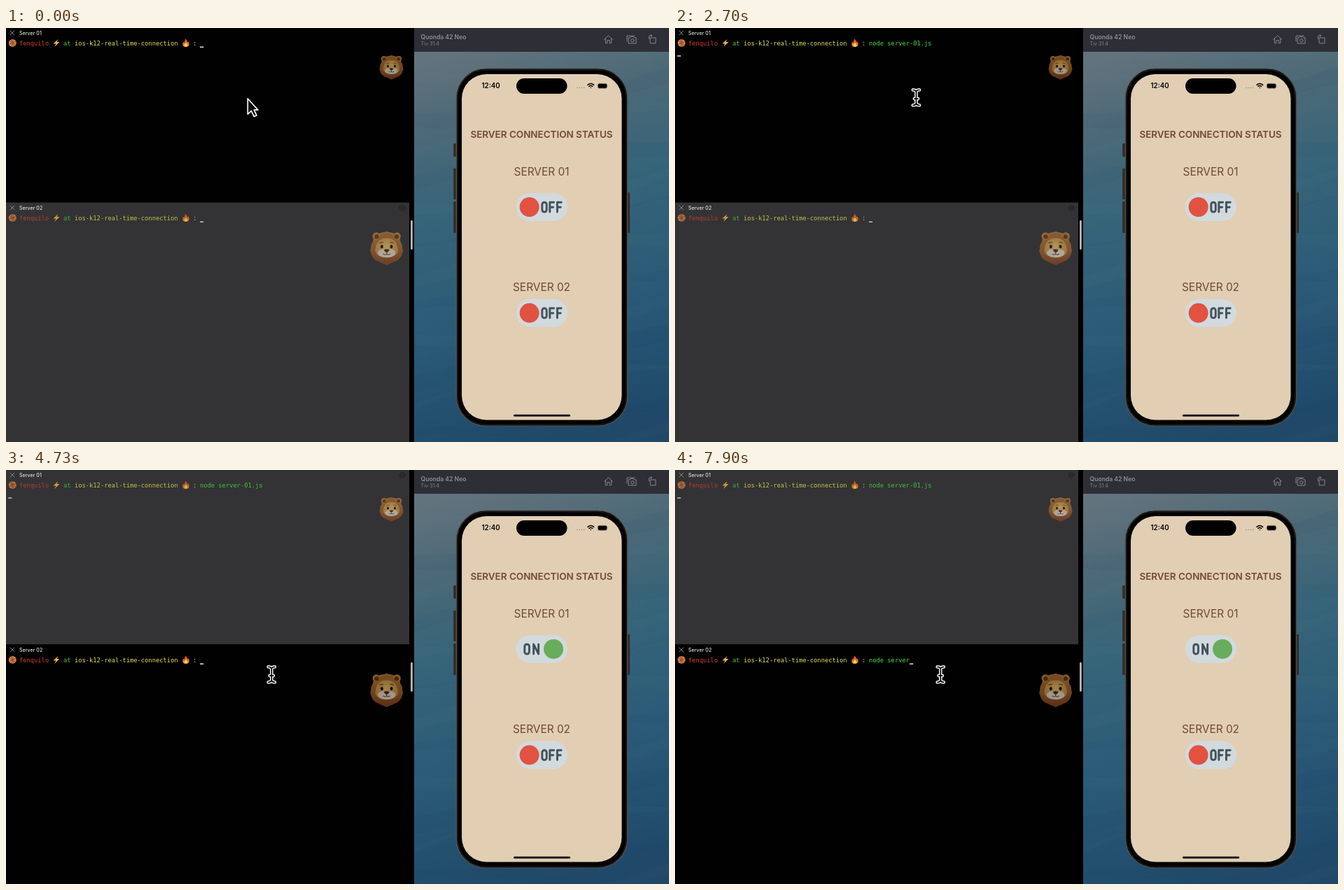
Recreate the animation shown at these times as an HTML page. Size 947 px wide and 592 px high, loop 8000 ms.

```html
<!DOCTYPE html>
<html lang="en">
<head>
<meta charset="utf-8">
<title>Server connection status</title>
<style>
  html, body { margin: 0; width: 100%; height: 100%; overflow: hidden; background: #000; }
  svg { display: block; width: 947px; height: 592px; font-family: Inter, "Open Sans", sans-serif; }
  .mono { font: 8.75px "DejaVu Sans Mono", "Liberation Mono", monospace; }
  .line { fill: none; stroke-linecap: round; stroke-linejoin: round; }
  .word { stroke: #42525c; stroke-width: 2.9; }
  .app { fill: #6f4a30; text-anchor: middle; }
</style>
</head>
<body>
<svg id="stage" viewBox="0 0 947 592">
  <defs>
    <linearGradient id="sea" gradientUnits="userSpaceOnUse" x1="650" y1="34" x2="790" y2="592">
      <stop offset="0" stop-color="#62737d"/>
      <stop offset=".18" stop-color="#4b6977"/>
      <stop offset=".4" stop-color="#356479"/>
      <stop offset=".68" stop-color="#2a5a77"/>
      <stop offset="1" stop-color="#1f4869"/>
    </linearGradient>
    <linearGradient id="mane" x1="0" y1="0" x2="0" y2="1">
      <stop offset="0" stop-color="#c08238"/>
      <stop offset=".55" stop-color="#a9662c"/>
      <stop offset="1" stop-color="#8a4523"/>
    </linearGradient>
    <radialGradient id="fur" cx=".5" cy=".4" r=".65">
      <stop offset="0" stop-color="#f0c266"/>
      <stop offset="1" stop-color="#cf9040"/>
    </radialGradient>
    <linearGradient id="flame" x1="0" y1="0" x2="0" y2="1">
      <stop offset="0" stop-color="#dc3d1c"/>
      <stop offset="1" stop-color="#f59a2c"/>
    </linearGradient>
    <clipPath id="desk"><rect x="583" y="34" width="364" height="558"/></clipPath>

    <g id="lion" opacity=".66">
      <path fill="url(#mane)" d="M0-24C-5-22-9-23-13-20C-18-18-20-13-20-9C-24-5-22 0-24 4C-22 9-22 13-18 16C-15 20-11 19-8 22C-5 22-3 25 0 25C3 25 5 22 8 22C11 19 15 20 18 16C22 13 22 9 24 4C22 0 24-5 20-9C20-13 18-18 13-20C9-23 5-22 0-24Z"/>
      <g fill="#c4873a"><circle cx="-15" cy="-17" r="5.6"/><circle cx="15" cy="-17" r="5.6"/></g>
      <g fill="#70391b"><circle cx="-14.5" cy="-16.4" r="3.2"/><circle cx="14.5" cy="-16.4" r="3.2"/></g>
      <path fill="#b2702f" d="M-13-9Q-12-21 0-22Q12-21 13-9Z"/>
      <path fill="url(#fur)" d="M0-14C10-15 15-8 16 0C19 8 11 14 0 14C-11 14-19 8-16 0C-15-8-10-15 0-14Z"/>
      <path fill="#eee4cf" d="M0 2C6 1 14 3 13 8C11 13 5 14 0 14C-5 14-11 13-13 8C-14 3-6 1 0 2Z"/>
      <path fill="#f0c470" d="M-3-6H3L4 4H-4Z"/>
      <path fill="#5a2b1b" d="M-4 2.5Q0 1 4 2.5Q3 6 0 6.6Q-3 6-4 2.5Z"/>
      <path class="line" stroke="#5a3a28" stroke-width="1" d="M0 6V9M-5 9Q-2 11 0 9Q2 11 5 9"/>
      <g fill="#17110e"><ellipse cx="-7" cy="-2" rx="2" ry="2.7"/><ellipse cx="7" cy="-2" rx="2" ry="2.7"/></g>
      <path class="line" stroke="#7a4219" stroke-width="1.1" d="M-10-7Q-8-9-5-8M10-7Q8-9 5-8"/>
    </g>

    <g id="ball">
      <circle r="5.5" fill="#dc8048"/>
      <path class="line" stroke="#5e321c" stroke-width=".6" d="M-5 2L5-2M-2-5L2 5M-4.6-3Q0-2-.5 5.4M.5-5.4Q0 2 4.6 3"/>
    </g>
    <path id="bolt" fill="#f5b53c" d="M2.5-5.5L-4.5 1.2H-.6L-2.8 5.5L4.5-1.4H.6Z"/>
    <g id="fire">
      <path fill="url(#flame)" d="M-1-6C2-4 2-2 2.4-.8L3.4-2.4C6 2 4.6 5.6 0 5.7C-5 5.6-5.6 1.6-3.6-1.8L-2.6 0C-2.4-2.4-1-3.6-1-6Z"/>
      <path fill="#ffd95a" d="M0-.4C2.6 2 2.8 5.2 0 5.3C-3 5.2-2.6 2 0-.4Z"/>
    </g>
    <g id="close" class="line" stroke="#8b8b8b" stroke-width=".9"><path d="M-3-3L3 3M3-3L-3 3"/></g>
    <path id="beam" d="M-4.6-11Q-1-11 0-8.4Q1-11 4.6-11M0-8.4V8.4M-4.6 11Q-1 11 0 8.4Q1 11 4.6 11M-2.6 1.6H2.6"/>
  </defs>

  <rect width="947" height="592"/>
  <g id="panes"></g>
  <rect x="578" y="275" width="2.8" height="42" rx="1.4" fill="#b8b8b8"/>

  <rect x="583" y="34" width="364" height="558" fill="url(#sea)"/>
  <g id="waves" clip-path="url(#desk)"></g>
  <rect x="583" width="364" height="34" fill="#2e2f36"/>
  <text x="592.5" y="16" font-size="8.6" font-weight="600" fill="#8e8f93">Quonda 42 Neo</text>
  <text x="592.5" y="25" font-size="7.2" fill="#838488">Tiv 31.4</text>
  <g class="line" stroke="#85868a" stroke-width="1">
    <path d="M854.5 16.5L860.5 10.8L866.5 16.5M856.3 15.2V21.8H858.8V17.6H862.2V21.8H864.7V15.2"/>
    <path d="M887 19V11.2H898M889.5 13.8H891.5L892.6 12.4H896.4L897.5 13.8H900V22H889.5Z"/>
    <circle cx="894.8" cy="17.8" r="2.2"/>
    <path d="M920.5 14H928V21.8H920.5ZM918.5 15.5V12Q918.5 11 919.5 11H922.5M921 9.3L922.7 11L921 12.7"/>
  </g>

  <g fill="#302b28">
    <rect x="639.2" y="165" width="4" height="19" rx="1"/>
    <rect x="639.2" y="201" width="4" height="44" rx="1"/>
    <rect x="639.2" y="248" width="4" height="45" rx="1"/>
    <rect x="887" y="235" width="4" height="58" rx="1"/>
  </g>
  <rect x="643.3" y="58" width="244.4" height="511" rx="42" fill="#020202" stroke="#5d554c" stroke-width="1.2"/>
  <rect x="645" y="59.8" width="241" height="507.4" rx="40" fill="none" stroke="#26221f" stroke-width="1"/>
  <rect x="651" y="66" width="228.5" height="494.5" rx="35" fill="#e1ceb3"/>
  <rect x="729" y="72" width="72.5" height="22" rx="11"/>
  <rect x="725" y="552.8" width="81" height="2.8" rx="1.4"/>
  <text x="679.5" y="86.3" font-size="9.7" font-weight="600">12:40</text>
  <path class="line" stroke="#8d8171" stroke-width="1.4" stroke-dasharray="0 3.2" d="M816 85.4H826"/>
  <g class="line" stroke="#000" stroke-width="1.5">
    <path d="M831 81.4Q835.3 77.7 839.6 81.4M832.8 83.5Q835.3 81.4 837.8 83.5"/>
    <path d="M835.3 85.4V85.5"/>
  </g>
  <rect x="845.3" y="79.4" width="13.2" height="6.8" rx="2.2" stroke="#8d8171" stroke-width=".8"/>
  <path d="M859.5 81.4Q861 82.8 859.5 84.2Z" fill="#8d8171"/>

  <text class="app" x="765" y="157" font-size="13.45" font-weight="600">SERVER CONNECTION STATUS</text>
  <text class="app" x="765" y="210.5" font-size="15.4">SERVER 01</text>
  <text class="app" x="765" y="376" font-size="15.4">SERVER 02</text>
  <g id="toggles"></g>

  <path id="arrow" d="M345.3 101V123.2L350.4 118.6L354.3 126.6L358 124.9L354.2 117.2H360Z" stroke="#fff" stroke-width="1.7" stroke-linejoin="round"/>
  <g id="caret" class="line">
    <use href="#beam" stroke="#fff" stroke-width="4.6"/>
    <use href="#beam" stroke="#000" stroke-width="1.7"/>
  </g>
</svg>

<script>
const LOOP = 8000, CELL = 5.27, PROMPT_X = 277;
const ENTER = 2700, CONNECT = 3630, MOVE = 4230, FOCUS = 4730;
const moveTimes = [4230, 4260, 4330, 4360, 4430, 4460, 4530];

// One key per time; "<" is a backspace.
const typing = [
  { keys: "node server-01.js", times: [30, 200, 290, 360, 460, 730, 830, 930, 1160,
    1330, 1430, 1630, 1930, 2060, 2160, 2360, 2430] },
  { keys: "node sev<rver", times: [5930, 6030, 6100, 6160, 6260, 6460, 6530, 6960,
    7330, 7430, 7660, 7830, 7900] }
];

const $ = id => document.getElementById(id);
const passed = (times, t) => times.filter(s => s <= t).length;
const show = (el, on) => el.setAttribute("visibility", on ? "visible" : "hidden");

function pane(i, height, lion) {
  const words = [[19, "#d9402a", "fenquilo"], [82, "#3ccf3a", "at"],
    [98, "#e8e34a", "ios-k12-real-time-connection"], [267, "#e0dc6a", ":"]];
  return `<g transform="translate(0 ${i * 250})">
    <rect id="bg${i}" y="-.5" width="576" height="${height}"/>
    <use href="#close" x="9" y="7"/>
    <text x="19" y="9.7" font-size="7.1" font-weight="500" fill="#e2e2e2">Server 0${i + 1}</text>
    <g id="badge${i}" class="line" stroke="#1c1c1d" stroke-width=".8">
      <circle cx="566" cy="7.3" r="3.7"/><path d="M564 6.3H568M564 8.3H568"/>
    </g>
    <g id="text${i}">
      <use href="#ball" x="9.3" y="21.4"/><use href="#bolt" x="72" y="21.4"/><use href="#fire" x="257" y="21.4"/>
      <g class="mono">
        ${words.map(([x, c, s]) => `<text x="${x}" y="24.8" fill="${c}">${s}</text>`).join("")}
        <text id="cmd${i}" x="${PROMPT_X}" y="24.8" fill="#45e33c"></text>
      </g>
      <rect id="bar${i}" width="5.2" height="1.4" fill="#f2f2f2"/>
    </g>
    <use href="#lion" transform="translate(${lion})"/>
  </g>`;
}

function toggle(i, y) {
  return `<g transform="translate(765.4 ${y})">
    <rect x="-36.7" y="-20" width="73.4" height="40" rx="20" fill="#d2dadd"/>
    <g id="off${i}" role="img" aria-label="OFF">
      <circle cx="-17.8" r="14" fill="#e15241"/>
      <g class="line word">
        <rect x=".4" y="-6.8" width="6.4" height="13.8" rx="3"/>
        <path d="M17.2-6.8H11.4V7M11.4.2H16.2M27.8-6.8H22V7M22 .2H26.8"/>
      </g>
    </g>
    <g id="on${i}" role="img" aria-label="ON">
      <circle cx="16.6" r="14" fill="#68ad5b"/>
      <g class="line word">
        <rect x="-24.6" y="-6.8" width="6.6" height="13.8" rx="3"/>
        <path d="M-11.8 7V-6.8L-4.8 7V-6.8"/>
      </g>
    </g>
  </g>`;
}

// Soft slanted ripples over the wallpaper.
function wave(k) {
  let top = "", back = "";
  const base = 75 + k * 46, depth = 14 + 7 * Math.sin(k * 2.3);
  for (let x = 575; x <= 955; x += 10) {
    const y = base - (x - 583) * .16 + 7 * Math.sin(x / 34 + k * 1.7);
    top += `${x} ${y.toFixed(1)} `;
    back = `${x} ${(y + depth + 5 * Math.sin(x / 50 + k)).toFixed(1)} ` + back;
  }
  return `<polygon points="${top}${back}" fill="${k % 2 ? "#0e3b58" : "#5b8c94"}" opacity=".045"/>`;
}

$("panes").innerHTML = pane(0, 250, "550.5 56) scale(.71") + pane(1, 342.5, "543.7 64.5) scale(.98");
$("toggles").innerHTML = toggle(0, 256) + toggle(1, 407.6);
$("waves").innerHTML = Array.from({ length: 13 }, (_, k) => wave(k)).join("");

function typed({ keys, times }, t) {
  let s = "";
  for (const key of keys.slice(0, passed(times, t))) s = key === "<" ? s.slice(0, -1) : s + key;
  return s;
}

function drawPane(i, t) {
  const active = (t >= FOCUS) === (i === 1), entered = i === 0 && t >= ENTER;
  const command = typed(typing[i], t);
  $("bg" + i).setAttribute("fill", active ? "#010102" : "#333335");
  $("text" + i).setAttribute("opacity", active ? 1 : .8);
  show($("badge" + i), !active);
  $("cmd" + i).textContent = command;
  $("bar" + i).setAttribute("x", entered ? 3.2 : PROMPT_X + command.length * CELL);
  $("bar" + i).setAttribute("y", entered ? 39.3 : 26.6);
}

function draw(t) {
  drawPane(0, t);
  drawPane(1, t);
  for (const i of [0, 1]) {
    const on = i === 0 && t >= CONNECT;
    show($("on" + i), on);
    show($("off" + i), !on);
  }
  show($("arrow"), t < ENTER);
  show($("caret"), t >= ENTER);
  const p = t < MOVE ? 0 : passed(moveTimes, t) / moveTimes.length;
  const e = p * p * (3 - 2 * p);
  $("caret").setAttribute("transform", `translate(${344.5 + 34.8 * e} ${99.5 + 193 * e})`);
}

const start = performance.now();
function tick() {
  draw((performance.now() - start) % LOOP);
  requestAnimationFrame(tick);
}
tick();
</script>
</body>
</html>
```
